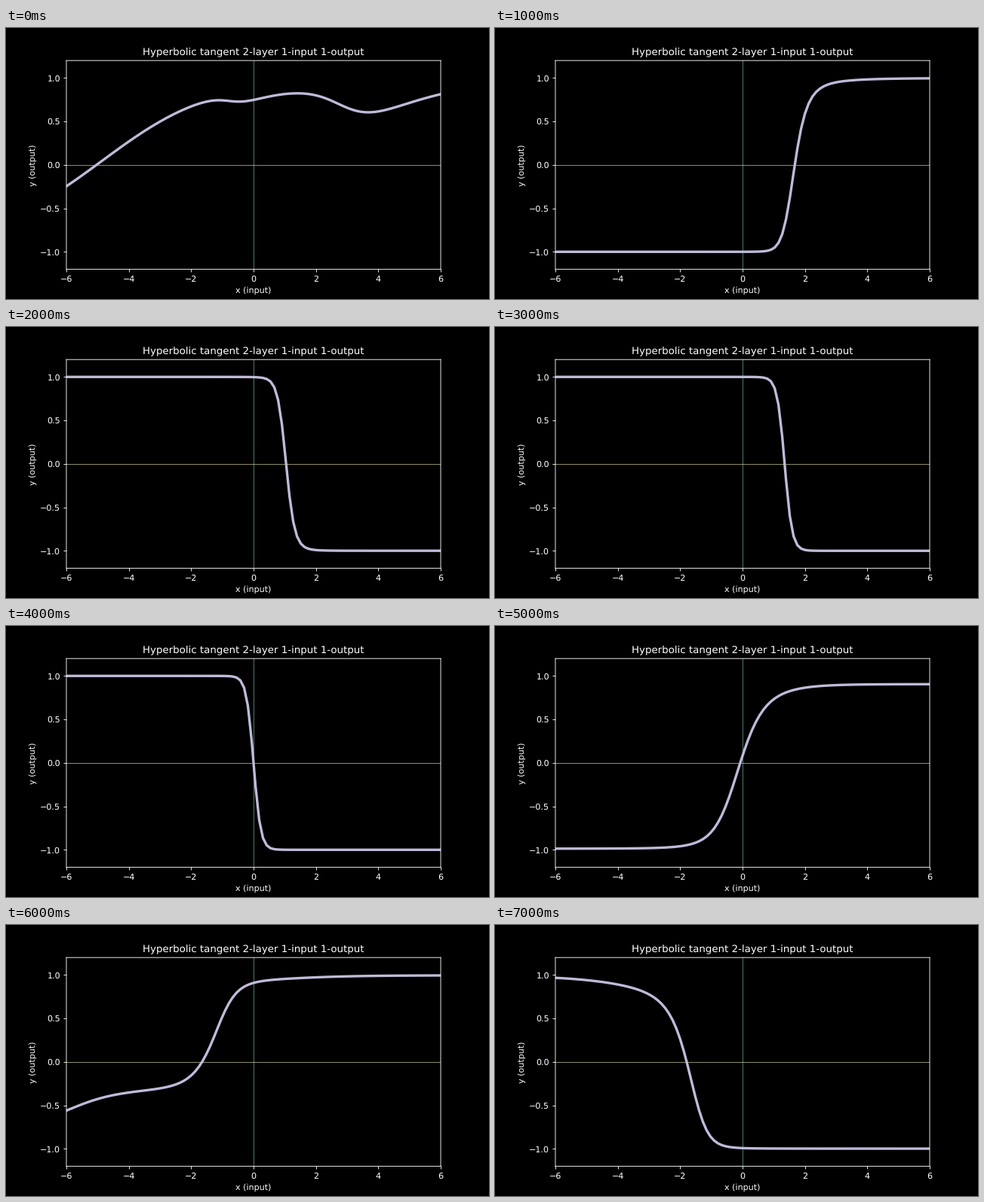
Animation of 640x360 px, one loop 8000 ms. Source, as a matplotlib script:

```python
import numpy as np
import matplotlib.pyplot as plt
from matplotlib.animation import FuncAnimation

plt.style.use("dark_background")
plt.rcParams["text.hinting"] = "none"

x = np.linspace(-6, 6, 100)


def net(bias, *units):
    """Two-layer tanh network; each unit is (weight, slope, centre)."""
    return np.tanh(bias + sum(w * np.tanh(s * (x - c)) for w, s, c in units))


# One set of weights per second
curves = [
    net(.44, (5.6, .05, 0), (-.21, 1.7, -.8), (-.73, .85, 2.53)),
    net(-1.193, (3.2, .88, 1), (1.6, .25, 3)),
    net(.527, (-4.6, .8, .9)),
    net(0, (-10, .42, 1.35)),
    net(0, (-10, .435, 0)),
    net(-.5, (2, .6, -.5)),
    net(1, (.93, 1.15, -.885), (.75, .35, 2.5), (.33, .65, -6.2)),
    net(-.257, (-2, .85, -1.1), (-1.2, .25, -5)),
]

fig, ax = plt.subplots(figsize=(8, 4.5), dpi=80)
ax.set(xlim=(-6, 6), ylim=(-1.2, 1.2), xlabel="x (input)",
       ylabel="y (output)",
       title="Hyperbolic tangent 2-layer 1-input 1-output")
ax.spines[:].set_snap(False)
ax.plot([0, 0], [-1.2, 1.2], color="C0", lw=.5)
ax.plot([-6, 6], [0, 0], color="C1", lw=.5)
line, = ax.plot(x, curves[0], color="C2", lw=3)


def update(i):
    line.set_ydata(curves[i])
    return line,


anim = FuncAnimation(fig, update, frames=len(curves), interval=1000,
                     repeat=True, repeat_delay=0)
plt.show()
```
